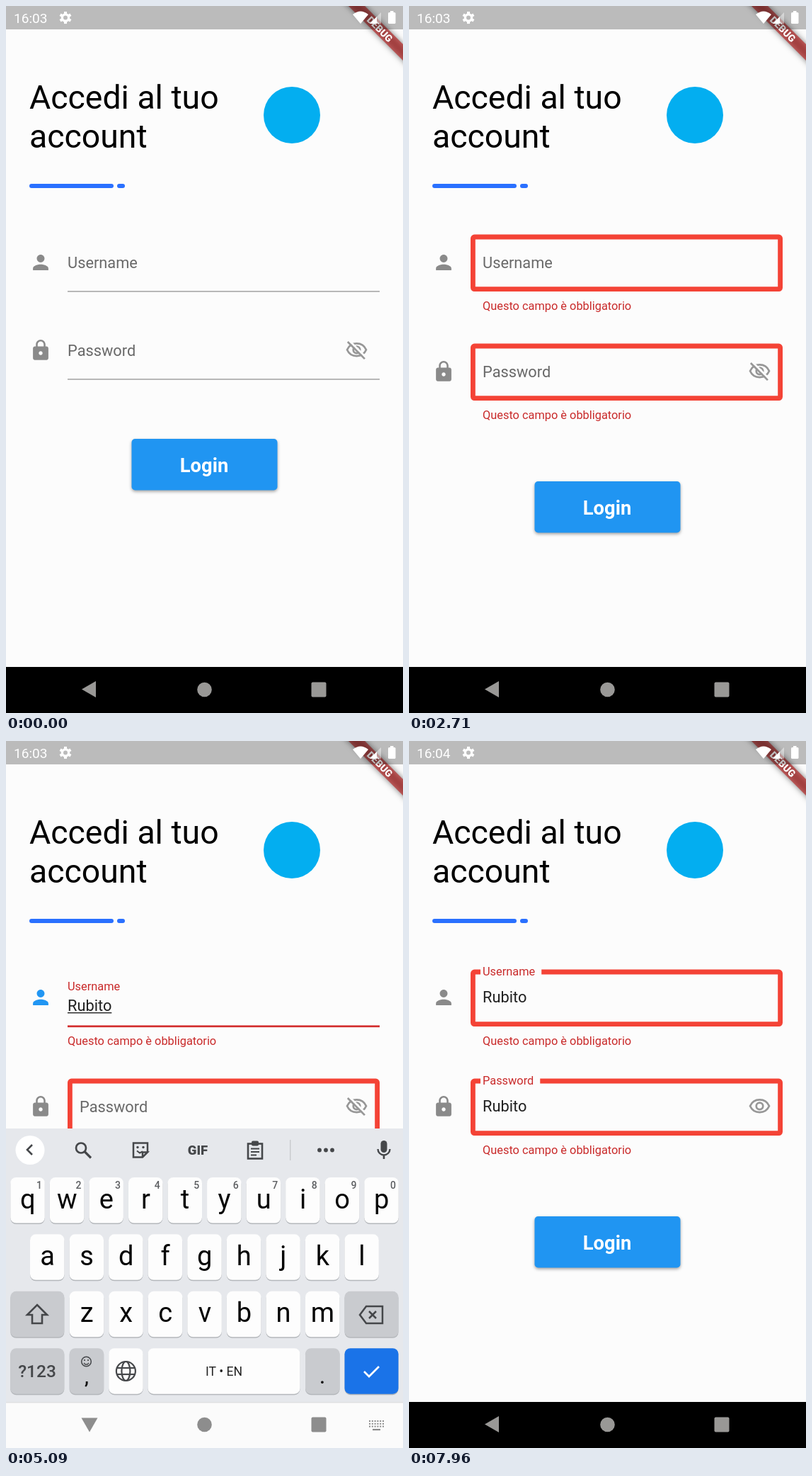
These frames come from a looping animation (561 px wide and 998 px high, 8 s). An HTML page with a canvas:

```html
<!DOCTYPE html>
<html lang="it">
<head>
<meta charset="utf-8">
<title>Login</title>
<style>
  html, body { margin: 0; width: 100%; height: 100%; overflow: hidden; background: #fcfcfc; }
  canvas { display: block; width: 561px; height: 998px; }
</style>
</head>
<body>
<canvas id="stage"></canvas>
<script>
const W = 561, H = 998, LOOP = 8000;
const canvas = document.getElementById('stage');
const ratio = window.devicePixelRatio || 1;
canvas.width = Math.round(W * ratio);
canvas.height = Math.round(H * ratio);
const ctx = canvas.getContext('2d');

const PAGE = '#fcfcfc', GREY = '#8a8a8a', BLUE = '#2196f3', RED = '#c92a2a', DARK = '#45474a';
const VALIDATE = 1990, KEYBOARD_IN = 3380, KEYBOARD_OUT = 7040, REVEAL = 7600;
const ENTRY = 'Rubito';
const PERSON = new Path2D('M12 12c2.21 0 4-1.79 4-4s-1.79-4-4-4-4 1.79-4 4 1.79 4 4 4zm0 2c-2.67 0-8 1.34-8 4v2h16v-2c0-2.66-5.33-4-8-4z');
const LOCK = new Path2D('M18 8h-1V6c0-2.76-2.24-5-5-5S7 3.24 7 6v2H6c-1.1 0-2 .9-2 2v10c0 1.1.9 2 2 2h12c1.1 0 2-.9 2-2V10c0-1.1-.9-2-2-2zm-6 9c-1.1 0-2-.9-2-2s.9-2 2-2 2 .9 2 2-.9 2-2 2zm3.1-9H8.9V6c0-1.71 1.39-3.1 3.1-3.1s3.1 1.39 3.1 3.1v2z');
const EYE = new Path2D('M2.1 11.5C3.8 7.6 7.6 5 12 5s8.2 2.6 9.9 6.5C20.2 15.4 16.4 18 12 18s-8.2-2.6-9.9-6.5z');

const fields = [
  { label: 'Username', icon: PERSON, focus: 3250, blur: 5300, keys: [3780, 3920, 4060, 4260, 4420, 4580] },
  { label: 'Password', icon: LOCK, focus: 5300, blur: 7000, keys: [5800, 5960, 6130, 6330, 6500, 6660], secret: true }
];

const clamp = v => Math.max(0, Math.min(1, v));
const linear = (t, start, length) => clamp((t - start) / length);
const ramp = (t, start, length) => { const p = linear(t, start, length); return p * p * (3 - 2 * p); };
const mix = (a, b, p) => a + (b - a) * p;

function text(string, x, y, size, color, align = 'left', weight = 400) {
  ctx.font = `${weight} ${size}px Roboto, sans-serif`;
  ctx.textAlign = align;
  ctx.fillStyle = color;
  ctx.fillText(string, x, y);
  return ctx.measureText(string).width;
}
function rect(x, y, w, h, color) { ctx.fillStyle = color; ctx.fillRect(x, y, w, h); }
function round(x, y, w, h, r, color) {
  ctx.beginPath();
  ctx.roundRect(x, y, w, h, r);
  ctx.fillStyle = color;
  ctx.fill();
}
function disc(x, y, r, color) {
  ctx.beginPath();
  ctx.arc(x, y, r, 0, 7);
  ctx.fillStyle = color;
  ctx.fill();
}
function ring(x, y, r, color, width) {
  ctx.beginPath();
  ctx.arc(x, y, r, 0, 7);
  ctx.strokeStyle = color;
  ctx.lineWidth = width;
  ctx.stroke();
}
function line(points, color, width) {
  ctx.beginPath();
  for (let i = 0; i < points.length; i += 2) ctx.lineTo(points[i], points[i + 1]);
  ctx.strokeStyle = color;
  ctx.lineWidth = width;
  ctx.stroke();
}
function poly(points, color) {
  ctx.beginPath();
  for (let i = 0; i < points.length; i += 2) ctx.lineTo(points[i], points[i + 1]);
  ctx.fillStyle = color;
  ctx.fill();
}
// Runs draw on a 24-unit icon grid centred at x, y.
function icon(x, y, draw, size = 32.7) {
  ctx.save();
  ctx.translate(x - size / 2, y - size / 2);
  ctx.scale(size / 24, size / 24);
  draw();
  ctx.restore();
}
function gear(x, y, size, color) {
  icon(x, y, () => {
    ring(12, 12, 5.3, color, 3.8);
    for (let i = 0; i < 6; i++) {
      const c = Math.cos(i * Math.PI / 3 + Math.PI / 6), s = Math.sin(i * Math.PI / 3 + Math.PI / 6);
      line([12 + 6 * c, 12 + 6 * s, 12 + 9.8 * c, 12 + 9.8 * s], color, 4.6);
    }
  }, size);
}

function eye(y, open) {
  icon(495.5, y, () => {
    ctx.strokeStyle = '#979797';
    ctx.lineWidth = 2;
    ctx.stroke(EYE);
    ring(12, 11.5, 3.5, '#979797', 2);
    if (open) return;
    line([4.1, 1.8, 21.8, 19.5], PAGE, 2.1);
    line([2.7, 3.2, 20.4, 20.9], '#979797', 2);
  });
}

function drawField(field, t, y) {
  const focused = t >= field.focus && t < field.blur;
  const outlined = t >= VALIDATE && !focused;
  // The frame swaps halfway through each 200 ms decoration change.
  const late = t - 100;
  const lateFocus = late >= field.focus && late < field.blur;
  const frame = late >= VALIDATE && !lateFocus;
  const x = outlined ? 104 : 87;
  const float = ramp(t, field.focus, 200);
  const count = field.keys.filter(k => t >= k).length;
  const size = mix(21.8, 16.36, float);
  const labelY = y + mix(7.5, outlined ? -31 : -10, float);

  icon(49, y, () => { ctx.fillStyle = focused ? BLUE : GREY; ctx.fill(field.icon); });

  if (frame) {
    ctx.beginPath();
    ctx.roundRect(90.4, y - 36, 434.2, 73.6, 2);
    ctx.strokeStyle = '#f44336';
    ctx.lineWidth = 6.8;
    ctx.stroke();
    if (float > 0) {
      ctx.font = '400 16.36px Roboto, sans-serif';
      rect(101, y - 41, (ctx.measureText(field.label).width + 12) * float, 9, PAGE);
    }
  } else if (lateFocus) {
    rect(87, y + 39.4, 441, 2.7, '#d32f2f');
  } else {
    rect(87, y + 40.2, 441, 1.4, '#9c9c9c');
  }

  const color = `rgb(${mix(105, 201, float)},${mix(105, 42, float)},${mix(105, 42, float)})`;
  text(field.label, x, labelY, size, color);

  const typed = ENTRY.slice(0, count);
  let value = typed;
  if (field.secret && t < REVEAL && count) {
    const peek = focused && t < field.keys[count - 1] + 1500;
    value = '•'.repeat(peek ? count - 1 : count) + (peek ? typed.slice(-1) : '');
  }
  const base = y + (outlined ? 6.5 : 19);
  const width = text(value, x, base, 21.8, '#212121');
  if (focused) {
    if (!field.secret && count) rect(x, base + 2, width, 1.4, '#212121');
    const since = t - (count ? field.keys[count - 1] : field.focus + 300);
    if (since >= 0 && since % 1000 < 500) rect(x + width, base - 20, 2.7, 25.5, BLUE);
  }

  ctx.globalAlpha = ramp(t, VALIDATE, 200);
  text('Questo campo è obbligatorio', x, y + 67, 16.36, RED);
  ctx.globalAlpha = 1;
  if (field.secret) eye(y, t >= REVEAL);
}

function drawButton(t, y) {
  const lift = ramp(t, 1880, 100) - ramp(t, 2020, 220);
  ctx.save();
  ctx.shadowColor = 'rgba(0,0,0,.36)';
  ctx.shadowBlur = mix(4, 11, lift) * ratio;
  ctx.shadowOffsetY = mix(2, 6, lift) * ratio;
  round(177.5, y, 206, 72.5, 5, '#2095f2');
  ctx.restore();

  const alpha = .13 * linear(t, 1920, 75) * (1 - linear(t, 2225, 375));
  if (alpha > 0) {
    const grow = ramp(t, 1990, 235);
    ctx.save();
    ctx.beginPath();
    ctx.roundRect(177.5, y, 206, 72.5, 5);
    ctx.clip();
    disc(mix(333, 280.5, grow), y + mix(21, 36, grow), mix(34, 114, grow), `rgba(255,255,255,${alpha})`);
    ctx.restore();
  }
  text('Login', 280, y + 46.5, 27.3, '#fff', 'center', 700);
}

function drawPage(t) {
  rect(0, 0, W, H, PAGE);
  text('Accedi al tuo', 33, 145, 46.4, '#000');
  text('account', 33, 200, 46.4, '#000');
  disc(404, 154, 40, '#03aef0');
  round(33, 251, 119, 6, 3, '#2a70ff');
  round(157, 251, 11, 6, 3, '#2a70ff');

  const shown = t >= VALIDATE;
  drawField(fields[0], t, 362);
  drawField(fields[1], t, shown ? 516 : 486);
  drawButton(t, shown ? 671 : 611);

  ctx.save();
  ctx.translate(W, 0);
  ctx.rotate(Math.PI / 4);
  ctx.filter = 'blur(4px)';
  rect(-80, 38.1, 160, 16.4, 'rgba(0,0,0,.5)');
  ctx.filter = 'none';
  rect(-80, 38.1, 160, 16.4, 'rgba(183,28,28,.63)');
  text('DEBUG', 0, 51.2, 13.9, '#fff', 'center', 900);
  ctx.restore();
}

function drawStatus(t) {
  rect(0, 0, W, 33, 'rgba(0,0,0,.26)');
  text(t < 7000 ? '16:03' : '16:04', 11, 24, 19.1, '#fff');
  gear(84, 16.5, 21, '#fff');
  ctx.beginPath();
  ctx.moveTo(501, 25);
  ctx.lineTo(490, 12);
  ctx.quadraticCurveTo(501, 3, 512, 12);
  ctx.fillStyle = '#fff';
  ctx.fill();
  poly([514, 25, 530, 9, 530, 25], 'rgba(255,255,255,.45)');
  poly([514, 25, 524, 15, 524, 25], '#fff');
  round(540, 9, 10.5, 16, 1.5, '#fff');
  rect(543, 7, 4.5, 3, '#fff');
}

function key(x, y, w, color = '#fdfdfd') {
  round(x, y + 1.5, w, 64.5, 8, '#b4b7bb');
  round(x, y, w, 64.5, 8, color);
}
function letters(row, x, y) {
  [...row].forEach((letter, i) => {
    const left = x + 55.55 * i;
    key(left, y, 48.5);
    text(letter, left + 24.5, y + 43.5, 38, '#050505', 'center');
  });
}

const tools = {
  search(x, y) {
    ring(x - 3, y - 3, 7, DARK, 2.7);
    line([x + 2, y + 2, x + 11, y + 11], DARK, 3.2);
  },
  sticker(x, y) {
    line([x + 10, y + 3, x + 10, y - 10, x - 10, y - 10, x - 10, y + 10, x + 3, y + 10, x + 10, y + 3, x + 3, y + 3, x + 3, y + 10], DARK, 2.5);
    disc(x - 4, y - 4, 1.7, DARK);
    disc(x + 4, y - 4, 1.7, DARK);
    line([x - 5, y + 1, x - 1, y + 4, x + 3, y + 2], DARK, 2);
  },
  gif(x, y) { text('GIF', x, y + 6.5, 18.5, DARK, 'center', 900); },
  clipboard(x, y) {
    ctx.strokeStyle = DARK;
    ctx.lineWidth = 2.6;
    ctx.strokeRect(x - 10, y - 9, 20, 21);
    round(x - 5, y - 13, 10, 7, 2, DARK);
    for (const row of [-2, 2.5, 7]) rect(x - 6, y + row - 1, row > 5 ? 8 : 12, 2, DARK);
  },
  gear(x, y) { gear(x, y, 29, DARK); },
  palette(x, y) {
    disc(x, y, 12, DARK);
    for (const [dx, dy] of [[-7, -1], [-3, -6], [3, -6], [7, -1]]) disc(x + dx, y + dy, 2, '#e6e8ec');
    disc(x + 5, y + 10, 5, '#e6e8ec');
    round(x, y + 2, 11, 5, 2.5, DARK);
  },
  resize(x, y) {
    line([x + 2, y + 10, x - 10, y + 10, x - 10, y - 10, x + 10, y - 10, x + 10, y - 1], DARK, 2.6);
    poly([x + 11, y, x + 11, y + 11, x + 5, y + 11, x + 5, y + 5], DARK);
    line([x - 2, y - 2, x + 6, y + 6], DARK, 2.5);
    line([x + 9, y + 1, x + 9, y + 10, x, y + 10], DARK, 3);
  }
};

function drawToolbar(t) {
  const early = t < 3700;
  if (early) rect(68.5, 547, 81, 60, '#cfd1d5');
  disc(34, 577.5, 20.5, '#fff');
  line([37, 570, 30, 577, 37, 584], DARK, 2.6);
  const names = early ? ['clipboard', 'gear', 'palette', 'resize'] : ['search', 'sticker', 'gif', 'clipboard'];
  names.forEach((name, i) => tools[name](109 + 81 * i, 577.5));
  rect(401, 563, 1.4, 29, '#c8cacd');
  for (const dx of [-9, 0, 9]) disc(452 + dx, 577.5, 2.9, DARK);
  round(529.5, 564, 9, 17, 4.5, DARK);
  ctx.beginPath();
  ctx.arc(534, 576, 8.5, 0, Math.PI);
  ctx.lineWidth = 2.4;
  ctx.strokeStyle = DARK;
  ctx.stroke();
  rect(532.7, 584, 2.6, 6, DARK);
}

function drawKeyboard(t, offset) {
  const password = t >= fields[1].focus + 100;
  const digits = [...'1234567890'];
  const special = '#c9cbcf';
  ctx.save();
  ctx.translate(0, offset);
  rect(0, 547, W, 451, '#e6e8ec');
  if (password) digits.forEach((d, i) => text(d, 30 + 55.55 * i, 588.5, 27, '#111', 'center'));
  else drawToolbar(t);

  letters('qwertyuiop', 6.3, 616);
  if (!password) digits.forEach((d, i) => text(d, 47 + 55.55 * i, 632, 14, '#5c5e61', 'center', 500));
  letters('asdfghjkl', 34, 696.3);
  letters('zxcvbnm', 89.7, 776.8);

  key(6.3, 776.8, 76, special);
  line([44, 796, 58, 810, 51, 810, 51, 822, 37, 822, 37, 810, 30, 810, 44, 796, 45, 797], DARK, 2.6);
  key(478.5, 776.8, 76, special);
  line([500, 810, 509, 798, 532, 798, 532, 822, 509, 822, 500, 810, 501, 809], DARK, 2.5);
  line([513, 805, 523, 815], DARK, 2.5);
  line([523, 805, 513, 815], DARK, 2.5);

  key(6.3, 857.2, 76, special);
  text('?123', 44, 898, 24.5, DARK, 'center', 500);
  key(89.7, 857.2, 48.5, special);
  text(',', 114, 907, 27, '#111', 'center', 500);
  if (!password) {
    ring(113.5, 876, 6.8, DARK, 1.5);
    disc(111, 874, 1.1, DARK);
    disc(116, 874, 1.1, DARK);
    line([110, 878, 112, 880, 115, 880, 117, 878], DARK, 1.3);
  }
  key(145.2, 857.2, 48.5);
  ring(169.4, 889.5, 13.5, DARK, 2.2);
  ctx.beginPath();
  ctx.ellipse(169.4, 889.5, 6, 13.5, 0, 0, 7);
  ctx.stroke();
  line([156.5, 885, 182.3, 885], DARK, 2.2);
  line([156.5, 894, 182.3, 894], DARK, 2.2);
  key(200.5, 857.2, 215);
  text(password ? 'Italiano' : 'IT • EN', 308, 896, 17.6, '#222', 'center');
  key(423, 857.2, 48.5, special);
  text('.', 447, 907, 27, '#111', 'center', 500);
  key(478.5, 857.2, 76, '#1a73e8');
  line([506, 890, 513, 897, 527, 883], '#fff', 2.7);
  rect(0, 933.5, W, 65, '#fbfbfb');
  rect(0, 933, W, 1.4, '#dedfe1');
  ctx.restore();
}

function drawNavigation(t, open) {
  const color = open ? 'rgba(125,125,125,.88)' : '#999896';
  const turn = ramp(t, 3460, 150) - ramp(t, KEYBOARD_OUT, 150);
  ctx.save();
  ctx.translate(118, 964.5);
  ctx.rotate(-turn * Math.PI / 2);
  poly([-11, 0, 9, -11.5, 9, 11.5], color);
  ctx.restore();
  disc(280.5, 965, 10.3, color);
  round(431.5, 954.5, 21, 21, 2, color);
  if (!open) return;
  for (let row = 0; row < 3; row++)
    for (let col = 0; col < 6; col++)
      rect(513 + col * 3.8, 959 + row * 3.8, 2, 2, color);
  rect(518, 971, 11, 2.2, color);
}

function render(t) {
  ctx.setTransform(ratio, 0, 0, ratio, 0, 0);
  drawPage(t);
  drawStatus(t);
  rect(0, 933, W, 65, '#000');
  const open = t > KEYBOARD_IN && t < KEYBOARD_OUT + 200;
  if (open) {
    const enter = Math.pow(1 - linear(t, KEYBOARD_IN, 250), 3);
    const leave = Math.pow(linear(t, KEYBOARD_OUT, 200), 2);
    drawKeyboard(t, 451 * Math.max(enter, leave));
  }
  drawNavigation(t, open);
}

const origin = performance.now();
function tick() {
  render((performance.now() - origin) % LOOP);
  requestAnimationFrame(tick);
}
tick();
</script>
</body>
</html>
```
